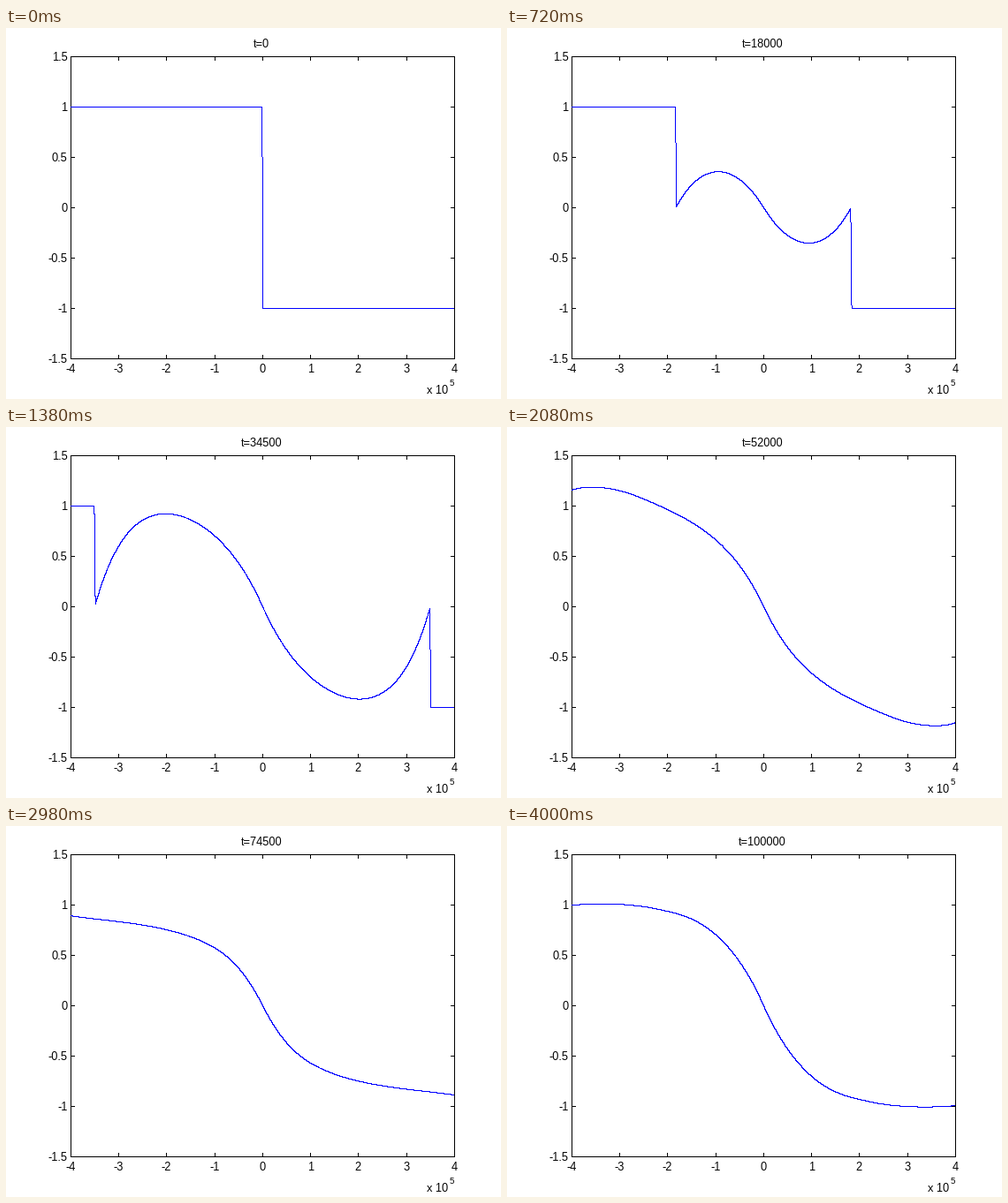
A matplotlib script for the animation above (4020 ms loop, 560 px wide and 420 px high).

```python
"""Geostrophic adjustment of a surface step in a rotating shallow layer."""
import numpy as np
import matplotlib.pyplot as plt
from matplotlib.animation import FuncAnimation

W, H, DPI = 560, 420, 100
FRAMES, INTERVAL, FRAME_DT = 201, 20, 500
LEFT, RIGHT, TOP, BOTTOM = 73, 507, 32, 374
PT = 72 / DPI

HALF = 4e5          # half width of the channel, m
CORIOLIS = 1e-4
CELLS = 3155        # odd, so the step falls between two nodes
SUBSTEPS = 20       # the wave crosses one cell per substep
POINTS = 360        # vertices of the plotted curve

plt.rcParams.update({
    "font.family": "Liberation Sans",
    "font.size": 12.8 * PT,
    "text.hinting": "default",
})


def solve():
    """Surface height at the plotted points for every frame."""
    x = np.linspace(-HALF, HALF, CELLS + 1)
    pick = np.rint(np.linspace(0, CELLS, POINTS)).astype(int)
    eta, u, v = -np.sign(x), np.zeros_like(x), np.zeros_like(x)
    turn = CORIOLIS * FRAME_DT / SUBSTEPS / 2
    cos, sin = np.cos(turn), np.sin(turn)
    rows = [eta[pick]]
    for _ in range(FRAMES - 1):
        for _ in range(SUBSTEPS):
            u, v = cos * u + sin * v, cos * v - sin * u
            p, q = eta + u, eta - u
            # invariants move one cell; open ends let waves leave
            p = np.concatenate(([p[1]], p[:-1]))
            q = np.concatenate((q[1:], [q[-2]]))
            eta, u = (p + q) / 2, (p - q) / 2
            u, v = cos * u + sin * v, cos * v - sin * u
        rows.append(eta[pick])
    return np.array(rows)


def to_px(x):
    return W * (.13 + .775 * (x + HALF) / (2 * HALF))


def to_py(y):
    return H * (.075 + .815 * (1.5 - y) / 3)


def pixel(a):
    return np.floor(np.asarray(a) + .5).astype(int)


fig = plt.figure(figsize=(W / DPI, H / DPI), dpi=DPI, facecolor="white")
ax = fig.add_axes([0, 0, 1, 1])


def stroke(x0, y0, x1, y1):
    """One-pixel line through the centres of two pixels."""
    ax.plot([x0 + .5, x1 + .5], [y0 + .5, y1 + .5], color="black", lw=PT,
            solid_capstyle="projecting", snap=False)


def label(x, y, text, ha="center", **kw):
    return ax.text(x, y, text, ha=ha, va="baseline", color="black", **kw)


for y in (TOP, BOTTOM):
    stroke(LEFT, y, RIGHT, y)
for x in (LEFT, RIGHT):
    stroke(x, TOP, x, BOTTOM)

TICK = 4
for n in range(-4, 5):
    x = pixel(to_px(n * 1e5))
    stroke(x, TOP, x, TOP + TICK)
    stroke(x, BOTTOM - TICK, x, BOTTOM)
    label(x - (.5 if n < 0 else 0) + .25, 390, f"{n}")
for n in range(-3, 4):
    y = pixel(to_py(n / 2))
    stroke(LEFT, y, LEFT + TICK, y)
    stroke(RIGHT - TICK, y, RIGHT, y)
    label(69.5, y + 5, f"{n / 2:g}", ha="right")

label(476.5, 414, "x 10", ha="left")
label(501.5, 405, "5", ha="left", fontsize=9.6 * PT)
title = label(288.7, 22, "t=0")

heights = solve()
# enough samples between vertices to leave no gap in a vertical jump
xs = np.linspace(-HALF, HALF, POINTS)
fine = np.linspace(-HALF, HALF, (POINTS - 1) * 250 + 1)
cols = pixel(to_px(fine))
inside = cols < RIGHT
cols = cols[inside]


def trace(eta):
    """Crisp one-pixel curve as a transparent layer."""
    layer = np.zeros((H, W, 4), np.uint8)
    rows = pixel(to_py(np.interp(fine, xs, eta)))[inside]
    layer[rows, cols] = 0, 0, 255, 255
    return layer


curve = ax.imshow(trace(heights[0]), extent=(0, W, H, 0), aspect="auto",
                  interpolation="nearest", zorder=3)
ax.set_xlim(0, W)
ax.set_ylim(H, 0)
ax.axis("off")


def update(i):
    curve.set_data(trace(heights[i]))
    title.set_text(f"t={i * FRAME_DT}")
    return curve, title


anim = FuncAnimation(fig, update, frames=FRAMES, interval=INTERVAL,
                     repeat=True, repeat_delay=0, blit=False)
plt.show()
```
